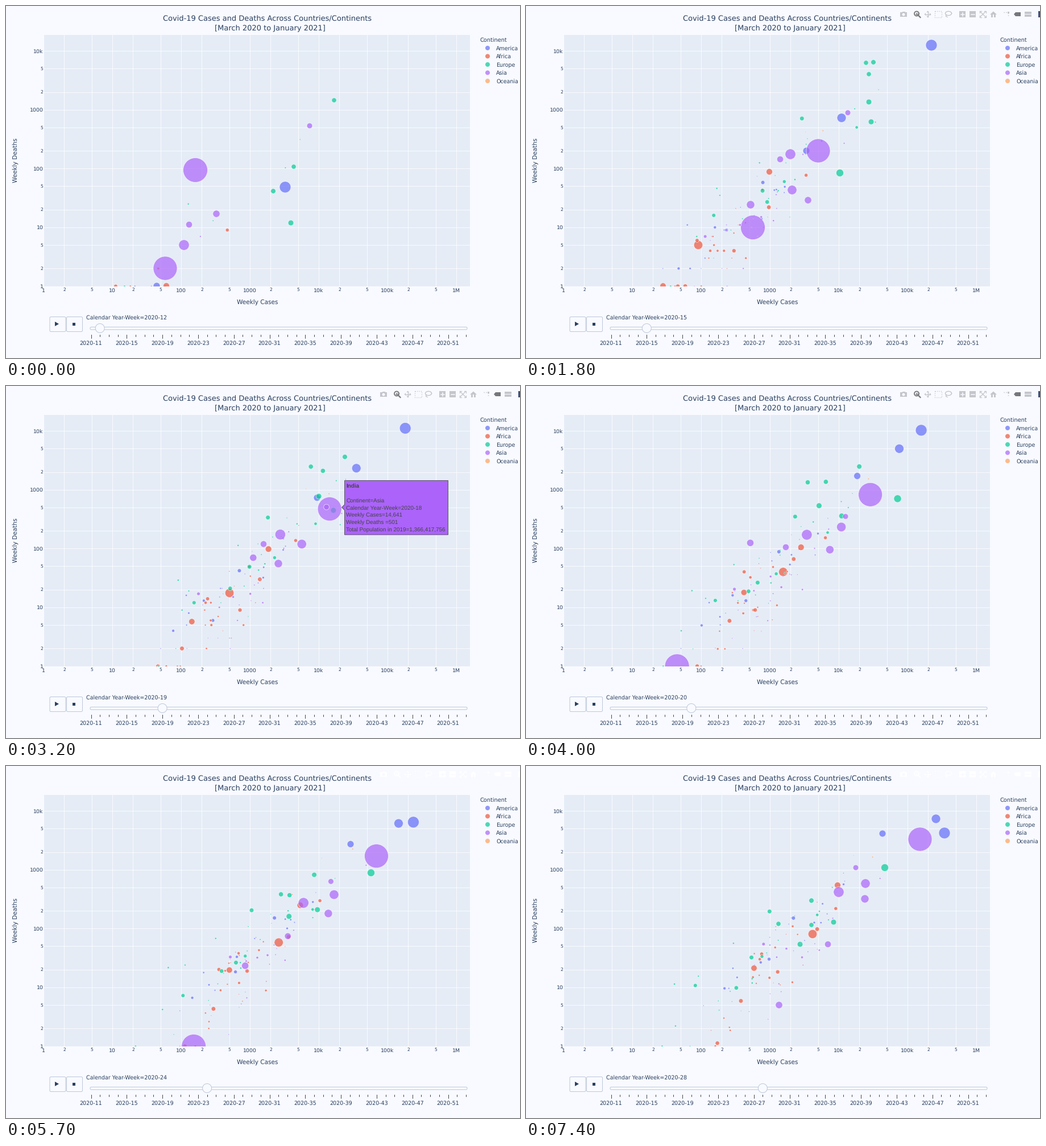
Animation, 904 px wide and 620 px high, one loop 7500 ms. Source, as a matplotlib script:

```python
import numpy as np
import matplotlib.pyplot as plt
from matplotlib.animation import FuncAnimation
from matplotlib.patches import Circle, Ellipse, FancyBboxPatch, Polygon, Rectangle

W, H, DPI = 904, 620, 64
PT = 72 / DPI  # points per pixel
FRAMES, STEP = 75, 100
RATE = 2.2  # weeks per second
PAPER, PLOT, INK, EDGE = "#f8faff", "#e5ecf6", "#2a3f5f", "#bec8d9"
COLORS = {"America": "#636efa", "Africa": "#ef553b", "Europe": "#00cc96",
          "Asia": "#ab63fa", "Oceania": "#ffa15a"}
NAMES = list(COLORS)
WEEKS = np.arange(11, 30)

plt.rcParams["font.family"] = "DejaVu Sans"
plt.rcParams["text.hinting"] = "none"
fig = plt.figure(figsize=(W / DPI, H / DPI), dpi=DPI, facecolor=PAPER)
ax = fig.add_axes([0, 0, 1, 1])
ax.set(xlim=(0, W), ylim=(H, 0))
ax.axis("off")


def text(x, y, s, px=9.5, ha="left", color=INK, **kw):
    kw.setdefault("va", "baseline")
    return ax.text(x, y, s, fontsize=px * PT, ha=ha, color=color, **kw)


def line(xs, ys, color, lw=1.0, **kw):
    return ax.plot(xs, ys, color=color, lw=lw * PT, **kw)[0]


def rounded(x, y, w, h, r, **kw):
    style = f"round,pad=0,rounding_size={r}"
    return ax.add_patch(FancyBboxPatch((x, y), w, h, boxstyle=style, **kw))


def px_x(log):
    return 66 + 121 * log


def px_y(log):
    return 493.5 - 103.6 * log


# Static layout
plot_area = ax.add_patch(Rectangle((66, 51), 750, 442.5, fc=PLOT, lw=0, zorder=0))
text(459.5, 26.5, "Covid-19 Cases and Deaths Across Countries/Continents", 13, "center")
text(464, 43.5, "[March 2020 to January 2021]", 13, "center")
text(442, 525, "Weekly Cases", 10.5, "center")
text(17, 272, "Weekly Deaths", 10.5, "center", rotation=90, va="center")

MAJOR = ["1", "10", "100", "1000", "10k", "100k", "1M"]
for power, name in enumerate(MAJOR):
    for digit in (1, 2, 5):
        log = power + np.log10(digit)
        label, px = (name, 9.4) if digit == 1 else (str(digit), 7.5)
        x, y = px_x(log), px_y(log)
        if x < 816:
            line([x, x], [51, 493.5], "white", 0.8, zorder=1)
            text(x, 504 if digit == 1 else 502, label, px, "center")
        if y > 51:
            line([66, 816], [y, y], "white", 0.8, zorder=1)
            text(65.5, y + px * 0.36, label, px, "right")

text(833, 63, "Continent", 9.8)
for i, name in enumerate(NAMES):
    y = 74 + 14.5 * i
    ax.add_patch(Circle((847, y), 4, fc=COLORS[name], alpha=0.7, lw=0))
    text(862, y + 3.5, name)

for x in (77, 106.5):
    rounded(x, 547.5, 28, 26, 2, fc=PAPER, ec=EDGE, lw=PT)
ax.add_patch(Polygon([(86, 556), (86, 564), (93, 560)], fc=INK, lw=0))
ax.add_patch(Rectangle((117, 557.5), 5, 5.5, fc=INK, lw=0))

rounded(148, 565.5, 663, 4.5, 2, fc=PAPER, ec=EDGE, lw=PT)
for i in range(43):
    x = 149.5 + 15.7 * i
    line([x, x], [579, 582 if i % 4 else 584.5], "#333333", 0.9)
    if i % 4 == 0:
        text(x, 596.5, f"2020-{11 + i}", ha="center")
thumb = ax.add_patch(Circle((165, 567.5), 8, fc=PAPER, ec=EDGE, lw=PT, zorder=5))
week_label = text(141, 551.5, "")

# Toolbar
tools, holes = [], []
ACTIVE = "#76777b"


def tool(artist, color="#c4c6cb"):
    artist.set_zorder(6)
    tools.append((artist, color))


def solid(points, **kw):
    tool(ax.add_patch(Polygon(points, lw=0)), **kw)


def box(x, y, w, h, **kw):
    solid([(x, y), (x + w, y), (x + w, y + h), (x, y + h)], **kw)


def stroke(xs, ys, lw=1.4, ls="-", **kw):
    tool(line(xs, ys, PAPER, lw, ls=ls), **kw)


def ring(x, y, rx, ry, lw=1.4, **kw):
    a = np.linspace(0, 2 * np.pi, 40)
    stroke(x + rx * np.cos(a), y + ry * np.sin(a), lw, **kw)


def hole(xs, ys):
    holes.append(line(xs, ys, PAPER, 1.5, zorder=7))


# camera, zoom, pan
box(658, 11, 12, 8)
box(661.5, 9.5, 5, 2)
holes.append(ax.add_patch(Ellipse((664, 15), 5, 5, fc=PAPER, lw=0, zorder=7)))
ring(687, 13.5, 4, 4, 1.8, color=ACTIVE)
stroke([690, 693.5], [16.5, 20], 2.2, color=ACTIVE)
stroke([685, 689], [13.5, 13.5], 1.2, color=ACTIVE)
stroke([687, 687], [11.5, 15.5], 1.2, color=ACTIVE)
stroke([702, 711], [14.5, 14.5])
stroke([706.5, 706.5], [10, 19])
for way in ((1, 0), (-1, 0), (0, 1), (0, -1)):
    way = np.array(way)
    tip, side = (706.5, 14.5) + 6 * way, 2.2 * way[::-1]
    solid([tip, tip - 2.6 * way + side, tip - 2.6 * way - side])
# box select, lasso, zoom in, zoom out
stroke([719, 730.5, 730.5, 719, 719], [9, 9, 20, 20, 9], 1.3, ":")
ring(743, 13, 5.5, 3.6)
stroke([739, 738.5, 741], [15.5, 18, 19.5])
for x in (762, 780):
    box(x, 9, 11, 11)
    hole([x + 2.5, x + 8.5], [14.5, 14.5])
hole([767.5, 767.5], [11.5, 17.5])
# autoscale, home
for sx in (-1, 1):
    stroke([803.5 - 5 * sx, 803.5 + 5 * sx], [9.5, 19.5], 1.3)
    for sy in (-1, 1):
        stroke(803.5 + sx * np.array([2.5, 5.5, 5.5]),
               14.5 + sy * np.array([5.5, 5.5, 2.5]), 1.2)
solid([(816, 15), (822, 9.5), (828, 15)])
box(818, 15, 3, 4.5)
box(823, 15, 3, 4.5)
# spikes, closest, compare, plain square
stroke([840, 847], [11, 11], 1.4, ":")
stroke([848, 848], [12, 19], 1.4, ":")
box(847, 10, 2.5, 2.5)
solid([(858, 14.5), (861, 11), (870, 11), (870, 18), (861, 18)], color=ACTIVE)
box(877, 10, 12, 3.6)
box(877, 15.4, 12, 3.6)
box(901, 9, 11, 11, color="#3f4f75")

# Bubbles: (continent index, radius, weekly places, weekly visibility)
bubbles = []


def track(name, r, *places, weeks=(11, 15, 20, 27)):
    """Large country through a few key places; None while off the chart."""
    known = [(w, p) for w, p in zip(weeks, places) if p]
    at = [w for w, _ in known]
    path = np.array([p for _, p in known], float)
    xy = np.column_stack([np.interp(WEEKS, at, path[:, i]) for i in (0, 1)])
    near = np.abs(WEEKS[:, None] - np.array(weeks)).argmin(axis=1)
    shown = np.array([places[i] is not None for i in near])
    bubbles.append((NAMES.index(name), r, xy, shown))


track("America", 10, (491, 319), (713, 69), (695, 78), (736, 118))
track("America", 8, None, (555, 197), (657, 110), (721, 93))
track("America", 6, (265, 493), (493, 255), (583, 158), (627, 119))
track("Africa", 7.8, None, (303, 421), (453, 327), (504, 296))
track("Africa", 5.5, (282, 493), (428, 292), (484, 284), (548, 210))
track("Africa", 5.3, None, (241, 493), (384, 363), (401, 356))
track("Europe", 6.6, None, (552, 294), (654, 198), (631, 179))
track("Europe", 4.9, (501, 382), (603, 169), (515, 211), (482, 314))
track("Europe", 4.9, None, (607, 204), (555, 229), (541, 275))
track("Europe", 4.4, (470, 326), (611, 99), (586, 142), (502, 237))
track("Europe", 4.2, (577, 166), (603, 120), (527, 169), (444, 278))
track("Europe", 4.2, (506, 283), (598, 100), (495, 170), (502, 280))
track("Asia", 21, (280, 462), (514, 255), (606, 191), (693, 129))
track("Asia", 21.5, (333, 289), (399, 390), None, (265, 494), None, (354, 494), None,
      weeks=(11, 15, 18, 20, 22, 25, 27))
track("Asia", 9.2, (313, 421), (465, 261), (494, 262), (550, 222))
track("Asia", 8.2, None, (468, 324), (555, 248), (597, 207))
track("Asia", 7.1, None, (395, 350), (535, 288), (596, 234))
track("Asia", 6.2, (370, 366), (496, 342), (394, 276), (445, 421))
track("Asia", 5.7, (322, 385), (447, 270), (457, 284), (531, 314))
track("Asia", 4.9, (534, 211), (566, 188), (562, 230), (580, 179))

# Small countries scatter about the trend; deaths are whole numbers
rng = np.random.default_rng(7)
SHARE = (0.2, 0.3, 0.27, 0.21, 0.02)
LETHALITY = dict(zip(NAMES, (-1.5, -1.65, -1.3, -1.7, -1.6)))


def small(name):
    curve = (-0.6, 0.2, 0, -0.2) if name == "Europe" else (-1.5, -0.5, -0.1, 0.15)
    growth = np.interp(WEEKS, (11, 15, 20, 27), curve)
    cases = rng.normal(2.9, 0.65) + growth + rng.normal(0, 0.1, WEEKS.size)
    rate = LETHALITY[name] + rng.normal(0, 0.3)
    deaths = 10 ** (cases + rate + rng.normal(0, 0.1, WEEKS.size))
    xy = np.column_stack([px_x(cases), px_y(np.log10(np.maximum(1, deaths.round())))])
    shown = (deaths > 0.5) & (WEEKS >= rng.integers(11, 16))
    bubbles.append((NAMES.index(name), 0.7 + 3.3 * rng.random() ** 2, xy, shown))


for name in rng.choice(NAMES, 95, p=SHARE):
    small(name)

bubbles.sort(key=lambda b: b[0])
paths = np.array([b[2] for b in bubbles])
shown = np.array([b[3] for b in bubbles])
radii = np.array([b[1] for b in bubbles])
dots = ax.scatter(*paths[:, 0].T, s=(2 * radii * PT) ** 2, alpha=0.7, zorder=3,
                  c=[COLORS[NAMES[b[0]]] for b in bubbles], edgecolors="white",
                  linewidths=np.where(radii > 1.5, 0.8, 0.3) * PT)
dots.set_clip_path(plot_area)


def hover(week, cases, deaths):
    x, y = px_x(np.log10(cases)), px_y(np.log10(deaths))
    left, top = x + 25.5, y - 47.3
    right, bottom = left + 182, top + 95.5
    pts = [(left, top), (right, top), (right, bottom), (left, bottom),
           (left, y + 5), (left - 5, y), (left, y - 5)]
    parts = [ax.add_patch(Polygon(pts, fc=COLORS["Asia"], ec="#444444",
                                  lw=0.8 * PT, zorder=8))]
    rows = ["India", "", "Continent=Asia", f"Calendar Year-Week=2020-{week}",
            f"Weekly Cases={cases:,}", f"Weekly Deaths ={deaths}",
            "Total Population in 2019=1,366,417,756"]
    for i, row in enumerate(rows):
        parts.append(text(left + 2.5, top + 12.7 + 12.75 * i, row, 9.85, color="#444444",
                          family="Liberation Sans", zorder=9,
                          weight="normal" if i else "bold"))
    return parts


hovers = [(29, 33, hover(18, 14641, 501)), (34, 37, hover(19, 24689, 634))]


def ease(p):
    return 4 * p ** 3 if p < 0.5 else 1 - 4 * (1 - p) ** 3


def draw(n):
    u = RATE * n * STEP / 1000 + 0.02
    week = int(u)
    p = ease(u - week)
    xy = paths[:, week] * (1 - p) + paths[:, week + 1] * p
    visible = shown[:, week + (p >= 0.5)]
    dots.set_offsets(np.where(visible[:, None], xy, -100))

    thumb.center = (149.5 + 15.7 * (week + 1), 567.5)
    week_label.set_text(f"Calendar Year-Week=2020-{12 + week}")

    faded = n > 52
    for artist, color in tools:
        artist.set_visible(n >= 13)
        artist.set_color("white" if faded else color)
    for artist in holes:
        artist.set_visible(n >= 13)
    for first, last, parts in hovers:
        for artist in parts:
            artist.set_visible(first <= n <= last)
    return []


anim = FuncAnimation(fig, draw, frames=FRAMES, interval=STEP, init_func=lambda: draw(0),
                     repeat=True, repeat_delay=0, blit=False)
plt.show()
```
